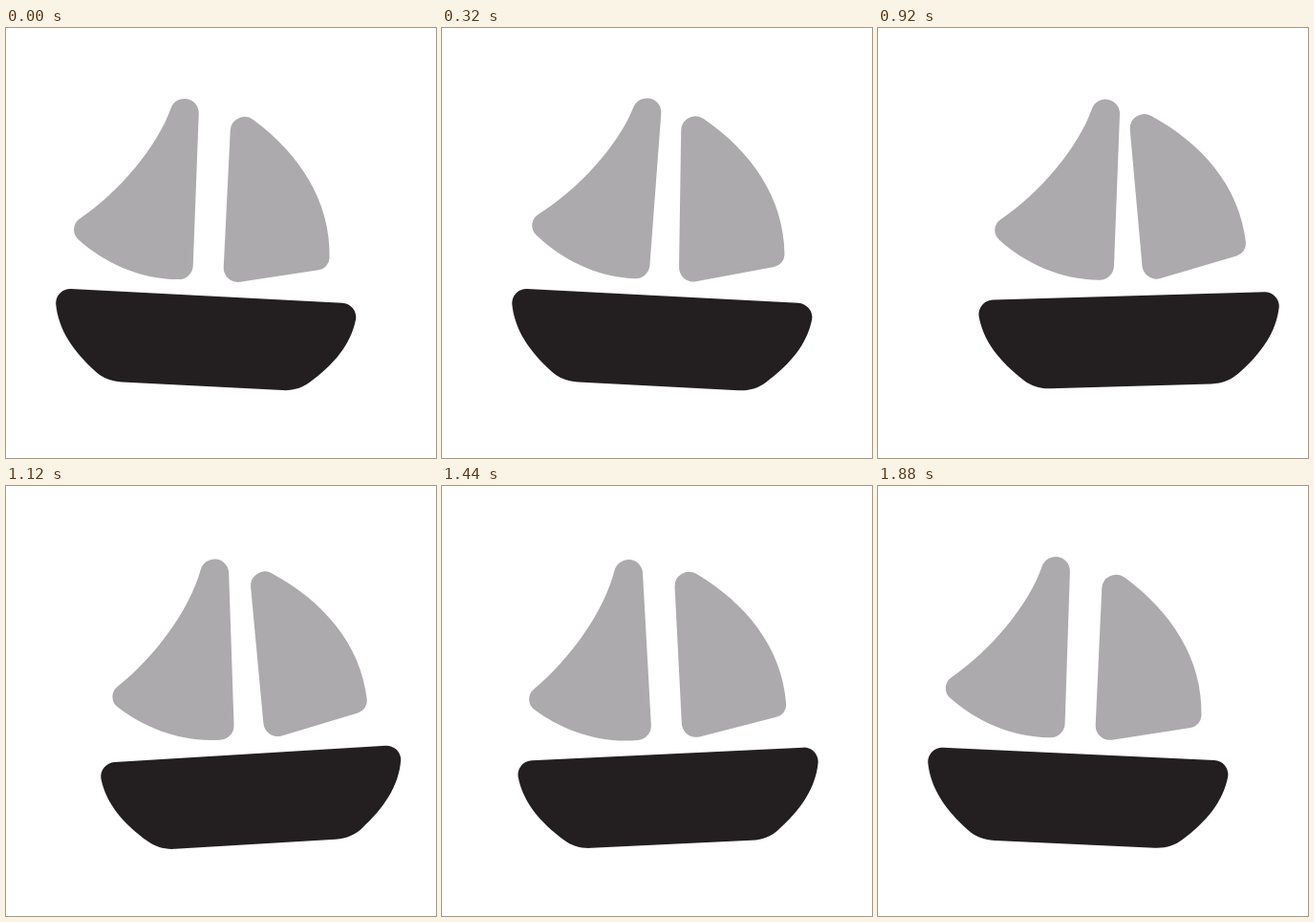
An HTML page with a canvas for the animation above (1920 ms loop, 450x450 px).

```html
<!DOCTYPE html>
<html lang="en">
<head>
<meta charset="utf-8">
<title>Sailing boat</title>
<style>
  html, body { margin: 0; width: 100%; height: 100%; overflow: hidden; background: #fff; }
  canvas { display: block; }
</style>
</head>
<body>
<canvas id="stage" width="450" height="450"></canvas>
<script>
const ctx = document.getElementById("stage").getContext("2d");
const LOOP = 1920, STEP = 40;
const DARK = "#231f20", GREY = "#acaaac";

// Each shape turns around its own pivot, given in path coordinates.
const hull = {
  color: DARK, x: 0, y: 0,
  path: new Path2D("M-142.2-15H142.2A15 15 0 0 1 157.2 1C153.5 28 136.5 50 112 70" +
    "C105 75.7 96 79.5 84 79.5H-84C-96 79.5-105 75.7-112 70C-136.5 50-153.5 28-157.2 1A15 15 0 0 1-142.2-15Z")
};
const backSail = {
  color: GREY, x: 180.7, y: 248,
  path: new Path2D("M195.7 248.6L201.7 89.6A15 15 0 0 0 172.6 83.8C158 125 118 172 76.9 199.8" +
    "A13.5 13.5 0 0 0 75.6 221.1C102 245 140 263 180 263A15 15 0 0 0 195.7 248.6Z")
};
const foreSail = {
  color: GREY, x: 242.5, y: 251,
  path: new Path2D("M227.5 250.3L234.5 107.3A15 15 0 0 1 258.5 96C306 131 340 181 338.3 241" +
    "A13.4 13.4 0 0 1 326.9 253.3L244.6 265.8A15 15 0 0 1 227.5 250.3Z")
};

// Periodic sway: mean, then cosine and sine weights of the harmonics.
function sway(p, mean, c1, s1, c2, s2, c3) {
  return mean + c1 * Math.cos(p) + s1 * Math.sin(p) +
    c2 * Math.cos(2 * p) + s2 * Math.sin(2 * p) + c3 * Math.cos(3 * p);
}

function put(shape, x, y, deg) {
  ctx.save();
  ctx.translate(x, y);
  ctx.rotate(deg * Math.PI / 180);
  ctx.translate(-shape.x, -shape.y);
  ctx.fillStyle = shape.color;
  ctx.fill(shape.path);
  ctx.restore();
}

function draw(ms) {
  const t = Math.floor((ms % LOOP) / STEP) * STEP;
  const p = 2 * Math.PI * t / LOOP;
  const x = sway(p, 237.9, -25.13, 3.52, -2.2, -0.64, -1.37);
  const roll = sway(p, 0.133, 2.431, 2.596, 0.272, -0.402, 0.114);
  const back = sway(p, -0.7, 0.41, 4.34, 0.28, -1.16, 0.01);
  const fore = sway(p, -4.374, 3.86, 1.03, 0.314, -0.052, 0.2);

  ctx.fillStyle = "#fff";
  ctx.fillRect(0, 0, 450, 450);
  put(backSail, x - 29.85 + 0.47 * roll + 0.3 * back, 248.5 - 0.4 * back - 0.15 * roll, back);
  put(foreSail, x + 32.95 + 0.47 * fore + 0.2 * roll + 0.08 * back,
    250.6 + 0.33 * fore + 0.14 * roll + 0.08 * back, fore);
  put(hull, x, 295.4, roll);
}

const start = performance.now();
function tick() {
  draw(performance.now() - start);
  requestAnimationFrame(tick);
}
tick();
</script>
</body>
</html>
```
